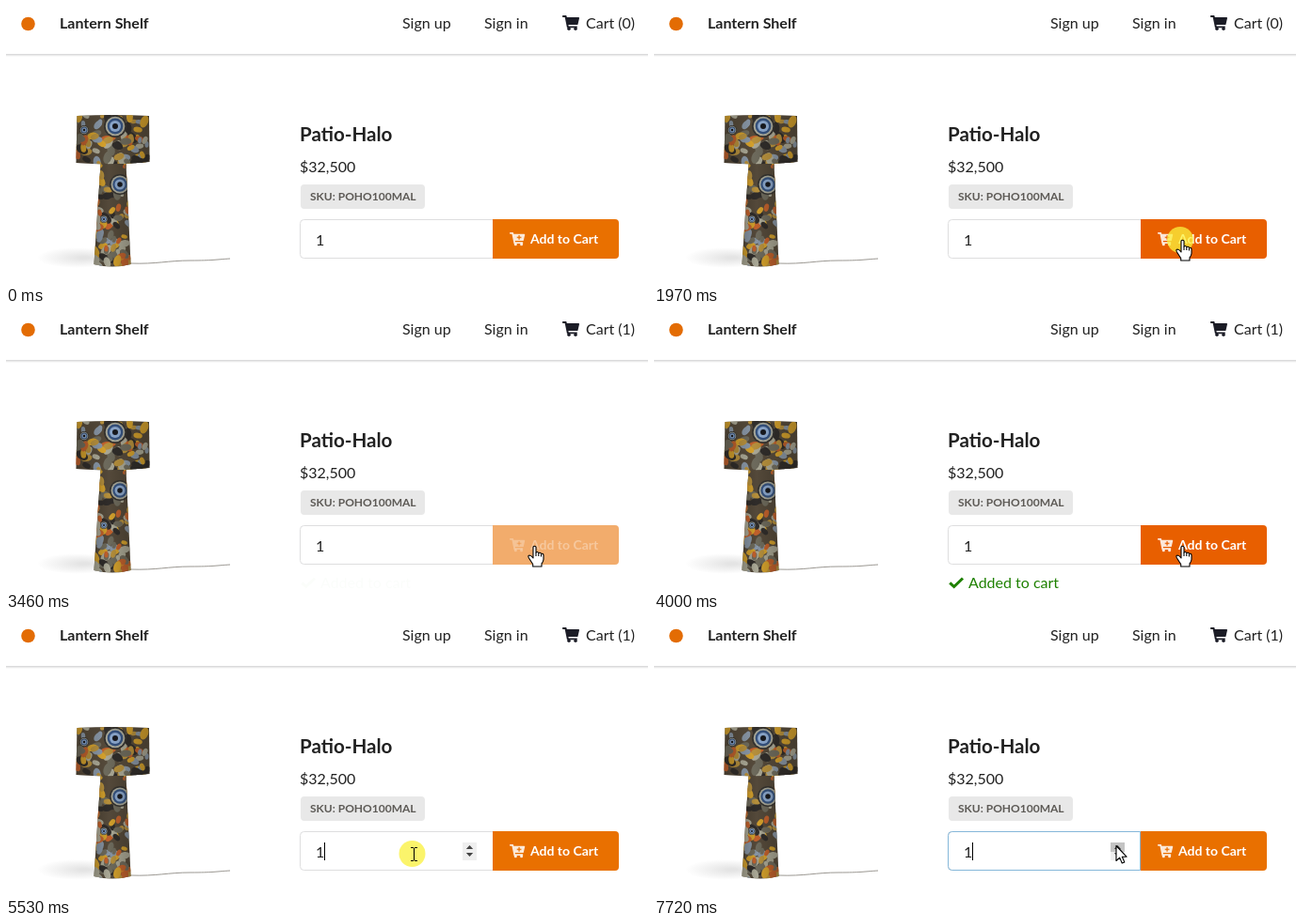
An HTML page with a canvas for the animation above (8000 ms loop, 682 px wide and 296 px high).

```html
<!DOCTYPE html>
<html lang="en">
<head>
<meta charset="utf-8">
<title>Add to cart</title>
<style>
  html, body { margin: 0; width: 100%; height: 100%; overflow: hidden; background: #fff; }
  canvas { display: block; width: 682px; height: 296px; }
</style>
</head>
<body>
<canvas id="stage" width="682" height="296"></canvas>
<script>
const ctx = document.getElementById('stage').getContext('2d', { alpha: false });
const LOOP = 8000;
const INK = '#212121', ORANGE = '#e97000', HOVER = '#e85f00';

const CLICK = 1970, LOADING = 2130, LOADED = 3430, FOCUS = 5530;

// start, end, steps, from x, y, to x, y
const MOVES = [
  [500, 880, 6, 502, 296, 397, 252],
  [1190, 1510, 5, 397, 252, 560.5, 249],
  [4370, 4770, 6, 560.5, 249, 433, 251],
  [6200, 6560, 6, 433, 251, 488, 241],
  [7020, 7260, 4, 488, 241, 491, 242.5]
];

const clamp = v => Math.min(1, Math.max(0, v));
const ramp = (t, a, b) => clamp((t - a) / (b - a));
const smooth = v => v * v * (3 - 2 * v);
const inside = (p, x, y, w, h) => p.x >= x && p.x < x + w && p.y >= y && p.y < y + h;

function pointerAt(t) {
  const move = MOVES.filter(m => t >= m[0]).pop();
  if (!move) return null;
  const [start, end, steps, x0, y0, x1, y1] = move;
  const k = clamp((Math.floor((t - start) / (end - start) * (steps - 1) + 1e-6) + 1) / steps);
  return { x: x0 + (x1 - x0) * k, y: y0 + (y1 - y0) * k };
}

function seeded(seed) {
  return () => (seed = (seed * 16807) % 2147483647) / 2147483647;
}

function rect(x, y, w, h, color) {
  ctx.fillStyle = color;
  ctx.fillRect(x, y, w, h);
}

function box(x, y, w, h, radii) {
  ctx.beginPath();
  ctx.roundRect(x, y, w, h, radii);
}

function oval(x, y, rx, ry, color, angle = 0) {
  ctx.fillStyle = color;
  ctx.beginPath();
  ctx.ellipse(x, y, rx, ry, angle, 0, Math.PI * 2);
  ctx.fill();
}

function disc(x, y, r, color) {
  oval(x, y, r, r, color);
}

function text(str, x, y, size = 16, weight = 400, color = INK) {
  ctx.font = `${weight} ${size}px Lato, sans-serif`;
  ctx.fillStyle = color;
  ctx.fillText(str, x, y);
}

function faded(alpha, draw) {
  ctx.save();
  ctx.globalAlpha = alpha;
  draw();
  ctx.restore();
}

function at(x, y, scale, draw) {
  ctx.save();
  ctx.translate(x, y);
  ctx.scale(scale, scale);
  draw();
  ctx.restore();
}

const cartBody = new Path2D('M0 .8Q0 0 .8 0H3.8Q4.4 0 4.5 .6L4.8 2H17.2Q18.2 2 18 3L16.5 9.4' +
  'Q16.4 10 15.8 10H6.4L6.7 11.5H15.2Q16 11.5 15.8 12.4L15.6 13.2H5L2.7 2H.8Q0 2 0 1.2Z');

function cartIcon(x, y, scale, color, plusColor) {
  at(x, y, scale, () => {
    ctx.fillStyle = color;
    ctx.fill(cartBody);
    disc(7, 14.2, 1.75, color);
    disc(14, 14.2, 1.75, color);
    if (plusColor) {
      rect(10.4, 3.4, 1.6, 5.2, plusColor);
      rect(8.6, 5.2, 5.2, 1.6, plusColor);
    }
  });
}

function drawHeader(count) {
  rect(0, 51, 682, 1, '#dbdbdc');
  rect(0, 52, 682, 1, '#e9e9e9');
  rect(0, 53, 682, 1, '#f8f8f8');
  disc(23.5, 19, 7.3, '#e36c04');
  text('Lantern Shelf', 57, 24, 16, 700);
  text('Sign up', 421, 24);
  text('Sign in', 508, 24);
  cartIcon(591, 10, 1, '#1b1c26');
  text(`Cart (${count})`, 616, 24);
}

const shade = new Path2D('M75.5 117Q114 115 152 117L152.5 166Q114 170 74.5 167Z');
const stem = new Path2D('M100.5 168H127.5L132.5 275Q113 280 93.5 275Z');
const tones = ['#d3a02c', '#c0602c', '#a9a795', '#8795a5', '#2f2c2a', '#b58f3c', '#6d6a5c'];

function eye(x, y, r) {
  disc(x, y, r, '#34322f');
  disc(x, y, r * 0.86, '#a9a99a');
  disc(x, y, r * 0.7, '#35527f');
  disc(x, y, r * 0.5, '#8ca9cf');
  disc(x, y, r * 0.25, '#17191f');
}

function pattern(part, x, y, w, h, count, seed) {
  const random = seeded(seed);
  ctx.save();
  ctx.clip(part);
  rect(x, y, w, h, '#54493a');
  for (let i = 0; i < count; i++) {
    const cx = x + random() * w, cy = y + random() * h;
    const r = 2.5 + random() * 3;
    const color = tones[Math.floor(random() * tones.length)];
    oval(cx, cy, r * 1.3, r * 0.8, color, random() * Math.PI);
  }
  if (part === shade) {
    eye(116, 128, 12);
    eye(83, 132, 5);
  } else {
    eye(121, 190, 11);
    eye(104, 227, 4);
  }
  const light = ctx.createLinearGradient(x, 0, x + w, 0);
  light.addColorStop(0, 'rgba(20,16,8,.25)');
  light.addColorStop(0.4, 'rgba(20,16,8,0)');
  light.addColorStop(1, 'rgba(20,16,8,.25)');
  rect(x, y, w, h, light);
  ctx.restore();
}

function drawLamp() {
  at(75, 268, 1, () => {
    ctx.scale(1, 0.26);
    const shadow = ctx.createRadialGradient(8, 0, 5, 0, 0, 42);
    shadow.addColorStop(0, '#e4e4e4');
    shadow.addColorStop(1, '#ffffff');
    disc(0, 0, 42, shadow);
  });
  ctx.strokeStyle = '#8f8c85';
  ctx.lineWidth = 0.9;
  ctx.stroke(new Path2D('M132 274C160 275 172 271 196 271S222 270 238 269'));

  pattern(stem, 93, 167, 40, 112, 95, 41);
  pattern(shade, 74, 115, 79, 55, 85, 77);
  ctx.lineWidth = 1;
}

function drawDetails() {
  text('Patio-Halo', 312, 144, 20.57, 700);
  text('$32,500', 312, 177);
  box(313, 190, 132, 26, 4);
  ctx.fillStyle = '#e8e8e8';
  ctx.fill();
  text('SKU: POHO100MAL', 323, 207, 12, 700, '#5d5a56');
}

function triangle(x, y, dir) {
  ctx.fillStyle = '#444';
  ctx.beginPath();
  ctx.moveTo(x - 3.7, y);
  ctx.lineTo(x + 3.7, y);
  ctx.lineTo(x, y + 4 * dir);
  ctx.fill();
}

function drawInput(t, pointer) {
  const focus = ramp(t, FOCUS, FOCUS + 220);
  ctx.strokeStyle = '#dededf';
  ctx.stroke(new Path2D('M517 227.5H316.5Q312.5 227.5 312.5 231.5V264.5Q312.5 268.5 316.5 268.5H517'));
  faded(focus, () => {
    box(312.5, 227.5, 204, 41, [4, 0, 0, 4]);
    ctx.strokeStyle = '#85b7d9';
    ctx.stroke();
  });
  text('1', 329, 255);

  const hovered = pointer && inside(pointer, 312, 227, 205, 42);
  if (hovered && t >= 1110) {
    rect(485, 239, 15, 19, '#efefef');
    if (inside(pointer, 485, 239, 15, 19)) rect(485, 239, 15, 10, '#c4c4c4');
    triangle(492.5, 246, -1);
    triangle(492.5, 250, 1);
  }
  if (t >= FOCUS && Math.floor((t - FOCUS) / 547) % 2 === 0) rect(338, 239, 1, 19, '#000');
}

function drawSpinner(t) {
  const turn = (t - LOADING) / 600 * Math.PI * 2 - Math.PI / 3;
  const arc = (from, to, color) => {
    ctx.beginPath();
    ctx.arc(584, 248, 7.8, from, to);
    ctx.strokeStyle = color;
    ctx.stroke();
  };
  ctx.lineWidth = 2.6;
  arc(0, Math.PI * 2, '#e3b58a');
  arc(turn - 1.1, turn + 1.1, '#fbe9da');
  ctx.lineWidth = 1;
}

function drawButton(t, hovered) {
  const loading = t >= LOADING && t < LOADED;
  const back = t < LOADING ? 1 : smooth(ramp(t, LOADED, LOADED + 100));
  const opacity = 0.45 + 0.55 * back;
  const color = hovered && back === 1 ? HOVER : ORANGE;

  faded(opacity, () => {
    box(517, 227, 134, 42, [0, 4, 4, 0]);
    ctx.fillStyle = color;
    ctx.fill();
  });

  if (loading) {
    drawSpinner(t);
  } else {
    const label = opacity * opacity;
    faded(label * 0.85, () => cartIcon(535, 241, 0.9, '#fff', color));
    faded(label, () => text('Add to Cart', 557, 253, 14, 700, '#fff'));
  }
}

function drawNotice(t) {
  const alpha = smooth(ramp(t, 3415, 3960)) * (1 - ramp(t, 4610, 5010));
  if (!alpha) return;
  faded(alpha, () => {
    ctx.strokeStyle = '#1e8000';
    ctx.lineWidth = 3;
    ctx.stroke(new Path2D('M314.3 288.3L318.7 292.5L328 283.5'));
    ctx.lineWidth = 1;
    text('Added to cart', 334, 294, 16, 400, '#1e8000');
  });
}

const arrow = new Path2D('M0 0V16L3.7 12.6L6.2 18.5L8.8 17.4L6.3 11.7H11Z');
const hand = new Path2D('M-.5 1.2Q1 -.8 2.5 1.2V7Q4 5.8 5.3 7.5Q7 6.8 8 8.3Q10.3 7.8 10.5 10' +
  'V14.5Q10 17.5 8.5 19V22H-.8V19.5Q-2.5 17 -5 13Q-6.5 10.2 -4.5 10Q-2.5 10.2 -.5 13Z');
const fingers = new Path2D('M2.5 7V11M5.3 7.5V11M8 8.5V11.5');

function drawPointer(t, pointer, onButton) {
  const { x, y } = pointer;
  const pressed = (t >= CLICK && t < LOADING) || (t >= FOCUS && t < FOCUS + 180);
  if (pressed) disc(x - 1.5, y, 14, 'rgba(250,240,60,.76)');

  const loading = t >= LOADING && t < LOADED;
  const overText = inside(pointer, 312, 227, 205, 42) && !inside(pointer, 485, 239, 15, 19);

  if (overText) {
    at(Math.round(x), Math.round(y), 1, () => {
      rect(0, -6, 1, 13, '#000');
      for (const row of [-7, 7]) {
        rect(-3, row, 3, 1, '#000');
        rect(1, row, 3, 1, '#000');
      }
    });
    return;
  }

  at(x, y, 1, () => {
    const useHand = onButton && !loading;
    const shape = useHand ? hand : arrow;
    ctx.lineJoin = 'round';
    ctx.lineWidth = 1.1;
    ctx.fillStyle = '#fff';
    ctx.strokeStyle = '#000';
    ctx.fill(shape);
    ctx.stroke(shape);
    if (useHand) ctx.stroke(fingers);
  });
}

function render() {
  const t = performance.now() % LOOP;
  const pointer = pointerAt(t);
  const onButton = !!pointer && inside(pointer, 517, 227, 134, 42);

  rect(0, 0, 682, 296, '#fff');
  drawHeader(t < LOADED - 40 ? 0 : 1);
  drawLamp();
  drawDetails();
  drawInput(t, pointer);
  drawButton(t, onButton);
  drawNotice(t);
  if (pointer) drawPointer(t, pointer, onButton);
  requestAnimationFrame(render);
}
render();
</script>
</body>
</html>
```
